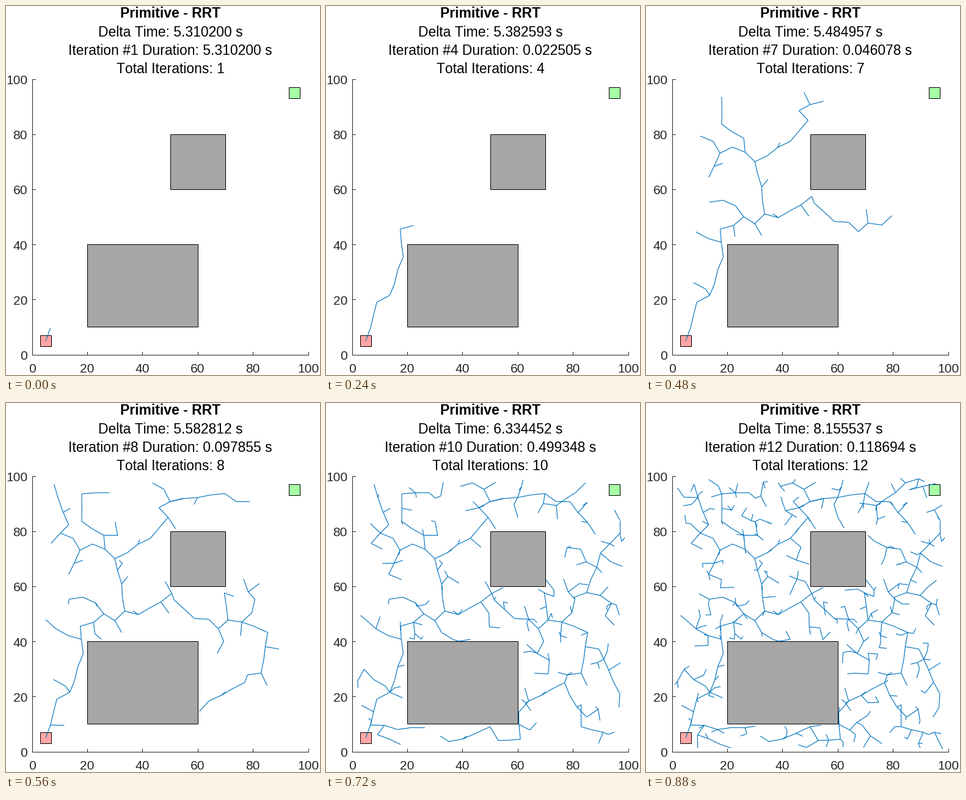
These frames come from a looping animation (514x604 px, 0.96 s). A matplotlib script:

```python
import math
import random
from itertools import islice

import matplotlib.pyplot as plt
from matplotlib.animation import FuncAnimation
from matplotlib.collections import LineCollection
from matplotlib.patches import Rectangle

W, H, DPI = 514, 604, 100
PX = 72 / DPI  # one pixel in points
LEFT, RIGHT, TOP, BOTTOM = 43, 495, 120, 571
INK, BLUE, GRAY = "#262626", "#0072BD", "#A6A6A6"
STEP = 5
START, GOAL = (3, 3, 4, 4), (93, 93, 4, 4)
OBSTACLES = [(20, 10, 40, 30), (50, 60, 20, 20)]
DURATIONS = [5.3102, 0.026117, 0.023771, 0.022505, 0.026567, 0.029719,
             0.046078, 0.097855, 0.252292, 0.499348, 1.702391, 0.118694]
TWIGS = [0, 0, 0, 1, 2, 5, 14, 34, 62, 85, 185, 10]  # random steps per iteration

# Main arms: first iteration, then the bends after the nearest tree node
ARMS = [
    (1, (6.7, 9.6), (9, 19), (13.7, 21.5), (18.6, 35.5), (17.5, 45.5)),
    (5, (26, 50), (30, 47.5), (33.6, 51), (38.5, 49.7), (46.7, 54.3)),
    (5, (32.5, 60.8), (30, 70), (26.5, 73.4)),
    (5, (23, 54), (18.4, 56)),
    (7, (26, 78.5), (18, 83.6), (18, 93.5)),
    (7, (42.9, 77.4), (49.3, 85), (46, 88.5), (50, 90.7), (60, 92.2)),
    (7, (51.5, 55), (58.8, 48.3), (64, 48), (67.5, 44.6), (71, 47.7),
     (76, 47), (85.4, 43.2)),
    (7, (13.3, 64.3)),
    (8, (83, 28.5), (78, 27.8), (77, 25), (64, 18.3)),
    (8, (13.3, 82.3), (8, 97)),
    (9, (73.2, 58.5), (70.1, 62.5)),
    (9, (80.5, 56), (85, 57.7), (90, 72), (97, 79.2), (97, 84)),
    (9, (69.3, 90), (74, 89.3), (81, 94)),
    (9, (60.4, 14.5), (61, 4.5)),
    (9, (93, 29.5), (97, 21)),
    (10, (83, 17), (83, 9), (91, 7)),
    (10, (53, 4), (50, 9), (40, 4.5)),
    (12, (86, 95), (95.4, 97.2)),
]

plt.rcParams["font.family"] = "Liberation Sans"
plt.rcParams["text.kerning_factor"] = 6


def sx(x):
    return LEFT + x * (RIGHT - LEFT) / 100


def sy(y):
    return BOTTOM - y * (BOTTOM - TOP) / 100


def lerp(a, b, t):
    return a[0] + (b[0] - a[0]) * t, a[1] + (b[1] - a[1]) * t


def blocked(a, b):
    points = [lerp(a, b, k / 8) for k in range(9)]
    return any(x < px < x + w and y < py < y + h
               for x, y, w, h in OBSTACLES + [GOAL] for px, py in points)


class Tree:
    def __init__(self, seed):
        self.rng = random.Random(seed)
        self.nodes = [(5, 5)]
        self.segments = []

    def nearest(self, point):
        return min(self.nodes, key=lambda n: math.dist(n, point))

    def add(self, a, b):
        self.nodes.append(b)
        self.segments.append((a, b))

    def follow(self, bends):
        """Walk along the bends, one slightly crooked step at a time."""
        here = self.nearest(bends[0])
        for bend in bends:
            start = here
            n = max(1, round(math.dist(start, bend) / STEP))
            for k in range(1, n + 1):
                tip = lerp(start, bend, k / n)
                if k < n:
                    tip = tuple(c + self.rng.uniform(-0.4, 0.4) for c in tip)
                self.add(here, tip)
                yield
                here = tip

    def explore(self):
        """Step from the nearest node towards a random point."""
        while True:
            aim = self.rng.uniform(1, 99), self.rng.uniform(0.5, 99.5)
            near = self.nearest(aim)
            d = math.dist(near, aim)
            tip = lerp(near, aim, min(1, STEP / max(d, 0.01)))
            if d > 1.2 and not blocked(near, tip):
                return self.add(near, tip)


def build_stages():
    tree = Tree(12)
    arms = [(first, tree.follow(bends)) for first, *bends in ARMS]
    stages = []
    for iteration, twigs in enumerate(TWIGS, 1):
        for first, walk in arms:
            if first <= iteration:
                list(islice(walk, iteration))  # arms speed up as the tree grows
        for _ in range(twigs):
            tree.explore()
        stages.append([[(sx(x), sy(y)) for x, y in s] for s in tree.segments])
    return stages


fig = plt.figure(figsize=(W / DPI, H / DPI), dpi=DPI, facecolor="white")
ax = fig.add_axes([0, 0, 1, 1])
ax.set_xlim(0.5, W + 0.5)
ax.set_ylim(H + 0.5, 0.5)
ax.axis("off")


def label(x, y, text="", size=21, color="black", ha="center", **kw):
    return ax.text(x, y, text, fontsize=size * PX, color=color, ha=ha,
                   va="baseline", **kw)


def rule(xs, ys):
    ax.plot(xs, ys, color=INK, lw=PX, zorder=1)


def box(x, y, w, h, color):
    ax.add_patch(Rectangle((sx(x), sy(y)), sx(w) - LEFT, sy(h) - BOTTOM,
                           fc=color, ec="black", lw=PX, zorder=2))


rule([LEFT, LEFT], [TOP, BOTTOM])
rule([LEFT, RIGHT], [BOTTOM, BOTTOM])
for v in range(0, 101, 20):
    x, y = sx(v), sy(v)
    rule([x, x], [BOTTOM, BOTTOM - 5])
    rule([LEFT, LEFT + 5], [y, y])
    label(x, 601, str(v), color=INK)
    label(35.5, y + 8.5, str(v), color=INK, ha="right")

for obstacle in OBSTACLES:
    box(*obstacle, GRAY)
box(*START, "#FFA6A6")
box(*GOAL, "#A6FFA6")

label(269.5, 19.5, "Primitive - RRT", 23, weight="bold")
heads = [label(269.5, y, size=22.9) for y in (51, 81, 111)]
lines = ax.add_collection(LineCollection([], colors=BLUE, linewidths=1.15 * PX,
                                         zorder=3), autolim=False)
stages = build_stages()


def update(i):
    n = i + 1
    lines.set_segments(stages[i])
    heads[0].set_text(f"Delta Time: {sum(DURATIONS[:n]):.6f} s")
    heads[1].set_text(f"Iteration #{n} Duration: {DURATIONS[i]:.6f} s")
    heads[2].set_text(f"Total Iterations: {n}")
    return [lines, *heads]


anim = FuncAnimation(fig, update, frames=len(DURATIONS), interval=80,
                     repeat=True, repeat_delay=0, blit=False)
plt.show()
```
